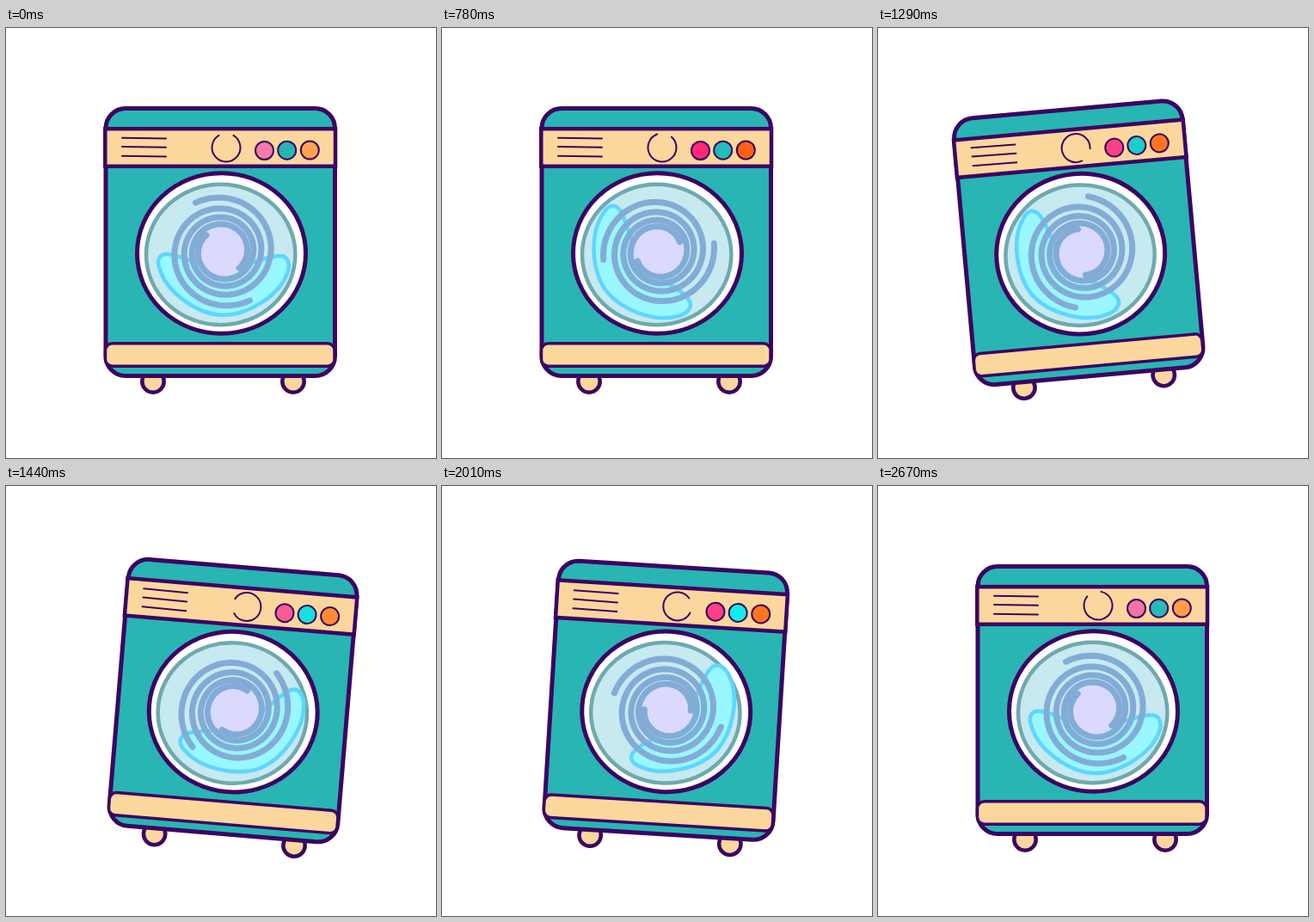
These frames come from a looping animation (500 px wide and 500 px high, 2700 ms). An HTML page:

```html
<!DOCTYPE html>
<html>
<head>
<meta charset="utf-8">
<style>
  html, body { margin: 0; width: 100%; height: 100%; overflow: hidden; background: #fff; }
  svg { display: block; width: 100vw; height: 100vh; }
</style>
</head>
<body>
<svg viewBox="0 0 500 500" fill="none" stroke="#3b0562" stroke-linecap="round" stroke-linejoin="round">
  <g id="machine">
    <g fill="#fcd79d" stroke-width="4.5">
      <circle cx="171" cy="411" r="12.7"/>
      <circle cx="334" cy="411" r="12.7"/>
    </g>
    <rect x="116" y="93.5" width="266.5" height="311" rx="23" fill="#29b5b3" stroke-width="5"/>
    <rect x="115.3" y="117.2" width="267.7" height="43.6" fill="#fcd79d" stroke-width="4.5" stroke-linejoin="miter"/>
    <path d="M135 127.8L186 128.5M135 138L186 138.8M135 148.8L186 149.5" stroke-width="2"/>
    <path id="dial" stroke-width="2"/>
    <g stroke-width="2">
      <circle id="pink" cx="300.5" cy="142.5" r="10.5"/>
      <circle id="teal" cx="326.7" cy="142.2" r="10.5"/>
      <circle id="orange" cx="353.3" cy="142" r="10.5"/>
    </g>
    <rect x="115.5" y="366.8" width="266.5" height="26.4" rx="8" fill="#fcd79d" stroke-width="3.5"/>
    <ellipse cx="250.5" cy="262" rx="98" ry="93.3" fill="#fff" stroke-width="5"/>
    <ellipse cx="249.7" cy="263.5" rx="86.7" ry="81.7" fill="#c7e9f0" stroke="#6fa9ae" stroke-width="4.5"/>
    <path id="water" fill="#99f7ff" stroke="#5ed6ff" stroke-width="4.5"
      d="M187 263C205 263 215 277 252 277S300 265 318 265C330 265 331 278 326 288C315 313 280 334 252 334C222 333 187 307 179 281C174 269 179 263 187 263Z"/>
    <g id="swirl">
      <circle cx="252" cy="260" r="29" fill="#dcd9ff" stroke="none"/>
      <path id="arms" stroke="#82acd6" stroke-width="7"/>
    </g>
  </g>
</svg>
<script>
const LOOP = 2700, STEP = 30, STEPS = LOOP / STEP;
const $ = id => document.getElementById(id);
const clamp = (v, lo, hi) => Math.min(hi, Math.max(lo, v));
const smooth = u => { u = clamp(u, 0, 1); return u * u * (3 - 2 * u); };
const wave = turns => Math.cos(2 * Math.PI * turns);
const blink = (f, times) => (1 - wave(times * f / STEPS)) / 2;

// Shakes three times in the middle of the loop, easing in and out of rest
function tilt(f) {
  const from = 42.8, to = 70.4;
  const ramp = smooth((f - 37) / (from - 37)) * smooth((80 - f) / (80 - to));
  return -5.2 * wave(3 * (clamp(f, from, to) - from) / (to - from)) * ramp;
}

// Water rocks to and fro, level at both ends of the loop
function slosh(f) {
  const half = 8.45;
  return -53 * wave(f / (2 * half)) * Math.min(1, f / half, (STEPS - f) / 5);
}

// The swirl starts slowly, speeds up and settles
const spinKeys = [[0, 0], [16, 46], [48, 253], [67, 493], [STEPS, 540]];
function spin(f) {
  const i = spinKeys.findIndex(k => f < k[0]);
  const [f0, a0] = spinKeys[i - 1], [f1, a1] = spinKeys[i];
  return a0 + (a1 - a0) * (f - f0) / (f1 - f0);
}

function polar(cx, cy, r, deg) {
  const a = deg * Math.PI / 180;
  return (cx + r * Math.cos(a)).toFixed(2) + ' ' + (cy + r * Math.sin(a)).toFixed(2);
}

function arm(start) {
  const pts = [];
  for (let a = 0; a <= 707; a += 4) {
    pts.push(polar(252, 260, 65 * Math.exp(-a / 800), start + a));
  }
  return 'M' + pts.join('L');
}

const mix = (a, b, u) => `rgb(${a.map((v, i) => Math.round(v + (b[i] - v) * u))})`;
const turn = (id, deg, x, y) => $(id).setAttribute('transform', `rotate(${deg} ${x} ${y})`);

$('arms').setAttribute('d', arm(241) + arm(61));
$('dial').setAttribute('d', `M${polar(256, 139, 16.5, -59)}A16.5 16.5 0 1 1 ${polar(256, 139, 16.5, -121)}`);

function draw(now) {
  const f = Math.floor(now % LOOP / STEP);
  turn('machine', tilt(f), 250, 427);
  turn('water', slosh(f), 250.5, 257);
  turn('swirl', spin(f), 252, 260);
  turn('dial', f * 28.1, 256, 139);
  const glow = Math.min(1, 1.1 * blink(f, 9));
  $('pink').setAttribute('fill', mix([241, 124, 170], [255, 40, 120], glow));
  $('orange').setAttribute('fill', mix([255, 164, 80], [255, 98, 14], glow));
  $('teal').setAttribute('fill', mix([38, 181, 179], [14, 240, 238], blink(f, 10)));
}

const start = performance.now();
function tick() {
  draw(performance.now() - start);
  requestAnimationFrame(tick);
}
tick();
</script>
</body>
</html>
```
